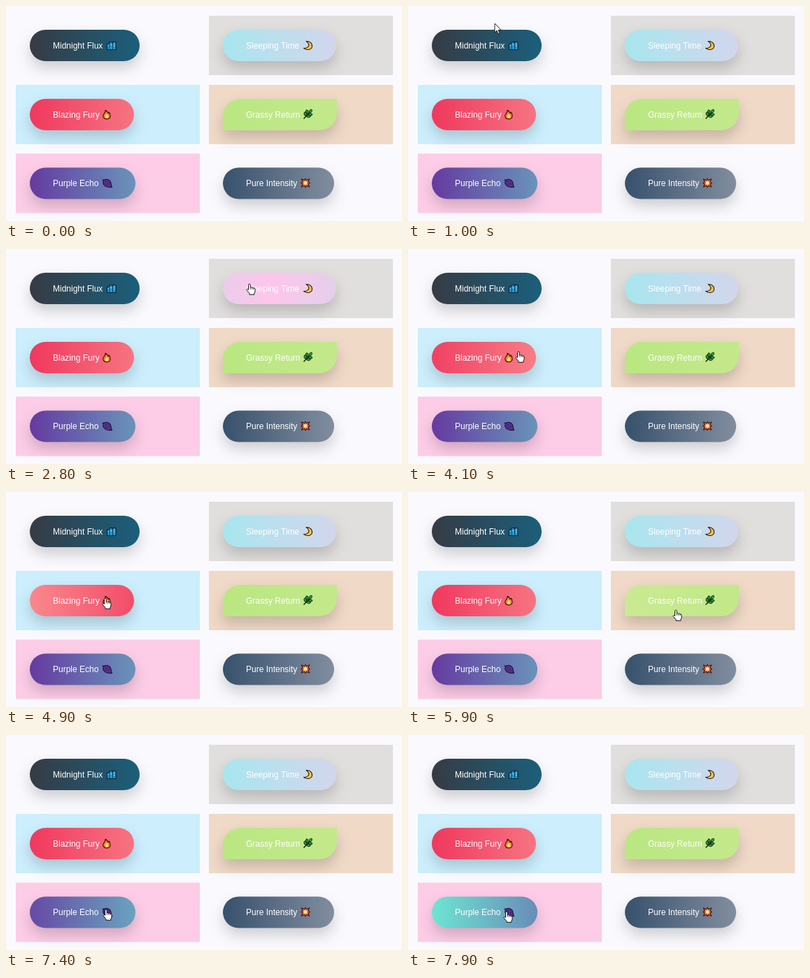
These frames come from a looping animation (566x308 px, 8 s). An HTML page with a canvas:

```html
<!DOCTYPE html>
<html lang="en">
<head>
<meta charset="utf-8">
<title>Gradient buttons</title>
<style>
html, body { margin: 0; width: 100%; height: 100%; overflow: hidden; background: #fafafe; }
canvas { display: block; }
</style>
</head>
<body>
<canvas id="stage" width="566" height="308"></canvas>
<script>
const ctx = document.getElementById('stage').getContext('2d');
const LOOP = 8000, STEP = 100, HALF = 1500;

const PILL = [22.5, 22.5, 22.5, 22.5];
const LEAF = [25, 1, 25, 1];

// from / to: the two gradient colours; hover: [enter, leave] in ms
const buttons = [
  { text: 'Midnight Flux', icon: city, iconX: 143, x: 34, y: 34, w: 157, from: [54, 59, 68], to: [0, 131, 178], hover: [1040, 2150] },
  { text: 'Sleeping Time', icon: moon, iconX: 424, x: 310, y: 34, w: 162, from: [168, 230, 238], to: [253, 198, 234], panel: '#e0dfdd', hover: [2340, 3800] },
  { text: 'Blazing Fury', icon: fire, iconX: 137, x: 34, y: 133, w: 149, from: [240, 56, 94], to: [253, 176, 164], panel: '#cceefd', hover: [4000, 5035] },
  { text: 'Grassy Return', icon: herb, iconX: 424, x: 310, y: 133, w: 163, from: [186, 231, 130], to: [204, 234, 148], panel: '#f0d9c7', radii: LEAF, hover: [5230, 7060] },
  { text: 'Purple Echo', icon: potato, iconX: 137, x: 34, y: 231.5, w: 151, from: [101, 58, 160], to: [110, 236, 212], panel: '#fdcce7', hover: [7290, 8000] },
  { text: 'Pure Intensity', icon: blast, iconX: 421, x: 310, y: 231.5, w: 159, from: [55, 81, 108], to: [204, 202, 210] }
];

// pointer stops: time, x, y
const path = [
  [640, 108, -20], [1240, 132, 50], [1700, 134, 52], [2000, 140, 53],
  [2450, 336, 52], [2800, 348, 50], [3300, 362, 52], [3650, 366, 54],
  [4100, 158, 147], [4800, 142, 152], [4900, 142, 152], [5400, 368, 162],
  [5900, 383, 169], [6700, 388, 166], [6950, 388, 166], [7420, 142, 250],
  [7900, 141, 253]
];

const smooth = k => k * k * (3 - 2 * k);
const mix = (a, b, k) => a + (b - a) * k;

// the standard CSS "ease" curve
function ease(x) {
  let lo = 0, hi = 1;
  for (let i = 0; i < 20; i++) {
    const m = (lo + hi) / 2, n = 1 - m;
    if (0.75 * n * n * m + 0.75 * n * m * m + m * m * m < x) lo = m; else hi = m;
  }
  const n = 1 - lo;
  return 0.3 * n * n * lo + 3 * n * lo * lo + lo * lo * lo;
}

const isOver = (b, t) => b.hover && t >= b.hover[0] && t < b.hover[1];

// background position: 0 to 1 and back while hovered
function shift(b, t) {
  if (!isOver(b, t)) return 0;
  const k = (t - b.hover[0]) / HALF % 2;
  return k < 1 ? ease(k) : 1 - ease(k - 1);
}

function pointerAt(t) {
  if (t < path[0][0]) return null;
  for (let i = 1; i < path.length; i++) {
    const a = path[i - 1], b = path[i];
    if (t <= b[0]) {
      const k = smooth((t - a[0]) / (b[0] - a[0]));
      return [mix(a[1], b[1], k), mix(a[2], b[2], k)];
    }
  }
  return path[path.length - 1].slice(1);
}

function shape(d, fill, stroke, width = 1) {
  const p = new Path2D(d);
  if (fill) { ctx.fillStyle = fill; ctx.fill(p); }
  if (stroke) {
    ctx.strokeStyle = stroke;
    ctx.lineWidth = width;
    ctx.stroke(p);
  }
}

// icons live in a 15 x 14 box
function city() {
  shape('M1.5 13V5.5L5 3.5V2H9V4L11 1.5L14 2.5V13Z', '#1f9bd8', '#10202e', 1.1);
  shape('M5 4V13M9.5 4.5V13', null, '#14384f', 1);
  shape('M2.5 7H4M6 6H8.5M11 5H13M11 8H13', null, '#8ad6f5', 1);
}
function moon() {
  shape('M5 1C10 .5 14 4 13.5 8.5C13 13 7 14.5 1.5 11C6 11 10 8.5 8.6 5C8 3 6.5 2 5 1Z', '#fbc34e', '#2b1d0c', 1.1);
}
function fire() {
  shape('M5 .8C8 2 8 3.5 9 5C10 5 10 4 10 3.5C13 6.5 13.5 13.2 7.2 13.4C1.5 13.4 .8 8.5 3.2 5.5C4.5 4 5.5 3 5 .8Z', '#f58220', '#2a0f0a', 1.1);
  shape('M7 6C10 8.5 10 12.4 7.2 12.5C4.2 12.4 4.2 9 7 6Z', '#ffdf8a');
}
function herb() {
  shape('M1.5 13L11 3', null, '#10300f', 1.6);
  const leaf = 'M0 0C-1-3 1-5 3.6-4.6C4.6-2 3 0 0 0Z';
  for (const [x, y, a] of [[9.5, 4.5, 0], [7, 6, -0.9], [8, 7, 0.9], [4.5, 9, -0.9], [5.5, 9.5, 0.9]]) {
    ctx.save();
    ctx.translate(x, y);
    ctx.rotate(a);
    shape(leaf, '#2f9e44', '#10300f', 1);
    ctx.restore();
  }
}
function potato() {
  shape('M1 2.5L3.5 2.8C6 .8 11 2 12.5 5.5C13.4 8 13 10.5 14.5 13C11 13.3 6 13.3 3.6 10.5C1.6 8 1.5 5.5 2.4 4.2Z', '#55308a', '#1c1230', 1.1);
  shape('M5 5L7 5.5M8.5 8L10.5 8.5M5.5 9L7 9.5', null, '#2b1748', 0.9);
}
function star(r, inner, fill, stroke) {
  ctx.beginPath();
  for (let i = 0; i < 16; i++) {
    const a = i * Math.PI / 8 + Math.PI / 4;
    const d = i % 2 ? inner : i % 4 ? r * 0.8 : r;
    ctx.lineTo(7 + d * Math.cos(a), 7 + d * Math.sin(a));
  }
  ctx.closePath();
  ctx.fillStyle = fill;
  ctx.fill();
  if (stroke) {
    ctx.strokeStyle = stroke;
    ctx.lineWidth = 1;
    ctx.stroke();
  }
}
function blast() {
  star(8.2, 4.3, '#e2372b', '#33130f');
  star(5.4, 2.8, '#fb9a2c');
  star(3.2, 1.8, '#fff0b0');
}

function drawPanel(b) {
  if (!b.panel) return;
  ctx.fillStyle = b.panel;
  ctx.fillRect(b.x - 20, b.y - 20, 263, 85);
}

function drawButton(b, t) {
  // the gradient is four times as wide as the button: from, to, from
  const left = b.x - 3 * b.w * shift(b, t);
  const g = ctx.createLinearGradient(left, 0, left + 4 * b.w, 0);
  const edge = `rgb(${b.from})`;
  g.addColorStop(0, edge);
  g.addColorStop(0.5, `rgb(${b.to})`);
  g.addColorStop(1, edge);

  ctx.save();
  ctx.shadowColor = 'rgba(0,0,0,0.18)';
  ctx.shadowBlur = 20;
  ctx.shadowOffsetY = 10;
  ctx.fillStyle = g;
  ctx.beginPath();
  ctx.roundRect(b.x, b.y, b.w, 45, b.radii || PILL);
  ctx.fill();
  ctx.restore();

  ctx.fillStyle = '#fff';
  ctx.font = '12px "Liberation Sans", Arial, sans-serif';
  ctx.fillText(b.text, b.x + 33, Math.floor(b.y) + 27);

  ctx.save();
  ctx.translate(b.iconX, Math.floor(b.y) + 15.5);
  b.icon();
  ctx.restore();
}

function drawPointer(t) {
  const p = pointerAt(t);
  if (!p) return;
  ctx.save();
  ctx.translate(Math.round(p[0]), Math.round(p[1]));
  if (buttons.some(b => isOver(b, t))) {
    shape('M-1.5 1.5Q-1.5 .2 -.2 .2Q1.2 .2 1.2 1.5V5Q2.5 4.3 3.6 5.3Q5 4.8 5.8 6Q7.8 5.6 8 7.5V10.5Q8 12 6.8 13.5V15.3H0V13.7L-3.6 9.5Q-4.4 8.2 -3.3 7.6Q-2.5 7.3 -1.5 8.6Z', '#fff', '#111', 1);
    shape('M1.2 5V8M3.6 5.6V8M5.8 6.2V8.2', null, '#111', 0.7);
  } else {
    shape('M0 0V13L3 10.2L5 14.8L7 14L5 9.5H9.2Z', '#fff', '#111', 0.9);
  }
  ctx.restore();
}

function draw(t) {
  ctx.fillStyle = '#fafafe';
  ctx.fillRect(0, 0, 566, 308);
  buttons.forEach(drawPanel);
  buttons.forEach(b => drawButton(b, t));
  drawPointer(t);
}

ctx.lineJoin = 'round';
const start = performance.now();
function tick() {
  const t = (performance.now() - start) % LOOP;
  draw(Math.floor(t / STEP) * STEP);
  requestAnimationFrame(tick);
}
tick();
</script>
</body>
</html>
```
